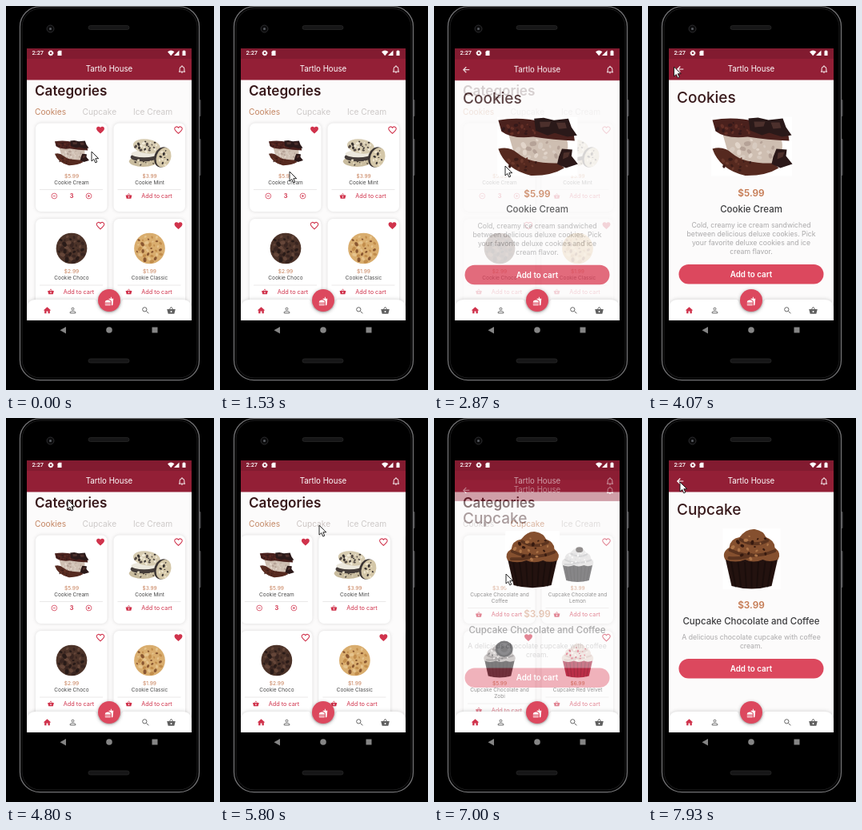
These frames come from a looping animation (260x480 px, 8 s). An HTML page:

```html
<!DOCTYPE html>
<html lang="en">
<head>
<meta charset="utf-8">
<title>Sweet shop app</title>
<style>
  html, body { margin: 0; width: 100%; height: 100%; overflow: hidden; background: #000; }
  svg { display: block; width: 100%; height: 100%; font-family: Inter, "Open Sans", sans-serif; }
  .card { filter: drop-shadow(0 0 2px #0002); }
  .bar { filter: drop-shadow(0 -1px 2px #0002); }
  .fab { filter: drop-shadow(0 1.5px 2px #0005); }
</style>
</head>
<body>
<svg id="stage" viewBox="0 0 260 480"></svg>
<script>
const LOOP = 8000, PAGE_MS = 240, TAB_AT = 5780, TAB_MS = 300, SCREEN_W = 206;
const RED = '#d0334c', PINK = '#dc485e', ORANGE = '#c57a52', GREY = '#606060';

const ICONS = {
  home: '<path d="M10 20v-6h4v6h5v-8h3L12 3 2 12h3v8z"/>',
  person: '<g fill="none" stroke="currentColor" stroke-width="2"><circle cx="12" cy="8" r="3"/><path d="M5 19v-2c0-4 14-4 14 0v2z"/></g>',
  search: '<g fill="none" stroke="currentColor" stroke-width="2"><circle cx="9.5" cy="9.5" r="5.5"/><path d="M14 14l6 6"/></g>',
  basket: '<path fill-rule="evenodd" d="M1 9h22l-3 12H4zM12 13a2 2 0 1 0 .1 0z"/><path d="M7 10l5-7 5 7" fill="none" stroke="currentColor" stroke-width="2"/>',
  heart: '<path d="M12 21C5 15 2 12 2 8.5A5.4 5.4 0 0 1 12 6a5.4 5.4 0 0 1 10 2.5C22 12 19 15 12 21z"/>',
  bell: '<path d="M6 17v-6a6 6 0 0 1 12 0v6l2 1.5H4zM12 5V2" fill="none" stroke="currentColor" stroke-width="2"/><path d="M10 20h4a2 2 0 0 1-4 0z"/>',
  back: '<path d="M20 12H5M12 5l-7 7 7 7" fill="none" stroke="currentColor" stroke-width="2.4"/>',
  food: '<path d="M18.06 23h1.66c.84 0 1.53-.64 1.63-1.46L23 5.05h-5V1h-2v4.05h-5l.3 2.34c1.7.47 3.3 1.32 4.27 2.26 1.44 1.42 2.43 2.89 2.43 5.29zM1 22v-1h15v1q0 1-1 1H2q-1 0-1-1zm15-7c0-8-15-8-15 0zM1 17h15v2H1z"/>',
  plus: '<path d="M3 12a9 9 0 1 0 18 0 9 9 0 1 0-18 0M8 12h8M12 8v8" fill="none" stroke="currentColor" stroke-width="2"/>',
  minus: '<path d="M3 12a9 9 0 1 0 18 0 9 9 0 1 0-18 0M8 12h8" fill="none" stroke="currentColor" stroke-width="2"/>'
};
const icon = (name, x, y, size, color, attrs = `fill="${color}"`) =>
  `<g transform="translate(${x - size / 2} ${y - size / 2}) scale(${size / 24})" color="${color}" ${attrs}>${ICONS[name]}</g>`;
const text = (x, y, str, size, fill, anchor = 'middle', weight = 400) =>
  `<text x="${x}" y="${y}" font-size="${size}" fill="${fill}" text-anchor="${anchor}" font-weight="${weight}">${str}</text>`;
const path = (d, fill) => `<path d="${d}" fill="${fill}"/>`;
const ellipse = (x, y, rx, ry, fill, turn = 0) =>
  `<ellipse cx="${x}" cy="${y}" rx="${rx}" ry="${ry}" fill="${fill}" transform="rotate(${turn} ${x} ${y})"/>`;

// Evenly spread crumbs inside an ellipse.
function crumbs(count, x, y, rx, ry, size, colors) {
  let out = '';
  for (let i = 0; i < count; i++) {
    const a = i * 2.4, r = Math.sqrt((i + .5) / count), s = size * (.6 + (i * 7 % 5) / 6);
    out += ellipse((x + rx * r * Math.cos(a)).toFixed(1), (y + ry * r * Math.sin(a)).toFixed(1),
      s.toFixed(1), (s * .7).toFixed(1), colors[i % colors.length], i * 50 % 180);
  }
  return out;
}

const roundCookie = (base, chips, size) => ellipse(0, 0, 43, 43, base) + crumbs(34, 0, 0, 38, 38, size, chips);

function cupcake(frost, shade, wrap, bits, topping = '') {
  let folds = '';
  for (let i = -3; i <= 3; i++) folds += `M${i * 8.5} 4L${i * 6.6} 36`;
  return path('M-36-38H36V38H-36Z', '#fff') + path('M-33-1H33L25 34Q0 41-25 34Z', wrap) +
    `<path d="${folds}" stroke="#0004" stroke-width="2"/>` +
    path('M-33 1Q-38-8-28-14Q-27-25-15-27Q-7-38 4-37Q15-35 18-27Q29-23 29-14Q38-7 33 1Q22 5 14 1Q2 6-8 1Q-20 6-33 1Z', frost) +
    `<path d="M-27-11Q0 2 29-10M-14-24Q4-14 20-23M-28-1Q-8 0 0-5" stroke="${shade}" stroke-width="4" fill="none" stroke-linecap="round"/>` +
    crumbs(20, 0, -15, 25, 15, 2.3, bits) + topping;
}

const PICTURES = {
  cream:
    path('M-50.5-37H50.5V37H-50.5Z', '#fff') +
    path('M-36-15L37-11Q41 6 34 18Q20 28 0 26Q-22 20-30 6Z', '#cebeb1') +
    crumbs(18, 3, 4, 28, 13, 3.4, ['#e2d5ca', '#b5a297', '#d8cbc0']) +
    path('M-49 3Q-35-1-24 9Q-9 22 27 21L34 27Q18 37-8 36.5Q-40 29-49 3Z', '#55291f') +
    crumbs(14, -20, 22, 19, 9, 2.2, ['#6a382b', '#3b1c18']) +
    path('M-49-33Q-22-38 6-31L34-27 46-14 47-7Q20-8-5-12Q-32-9-45-19Z', '#4a211d') +
    crumbs(18, -20, -22, 23, 8, 2.2, ['#653027', '#34191a']) +
    path('M-4-35L8-36 21-33 39-35 43-24 50-14 38-12 22-17 13-14-2-20Z', '#2a1919') +
    path('M3-31L17-31 15-25 4-24ZM24-30L35-30 37-23 27-22Z', '#4c302c') +
    path('M31 3L44 4 43 12 51 22 36 27 25 22 27 13Z', '#2b1818') +
    path('M33 8L41 7 39 13 32 16Z', '#4e302b'),
  mint:
    ellipse(-18, 24, 39, 15, '#c9bc9e') + ellipse(-16, 12, 37, 12, '#453d3a') +
    ellipse(-15, 3, 36, 10, '#ece8dd') + ellipse(-8, -18, 38, 20, '#d6cbb0', 8) +
    ellipse(35, 12, 22, 29, '#3c3533', 20) + ellipse(39, 13, 20, 28, '#d4c7a8', 20) +
    crumbs(20, -8, -18, 33, 15, 4, ['#37312f', '#f1ead8', '#544a44']) +
    crumbs(12, 39, 13, 14, 22, 3.7, ['#37312f', '#eee4cd']) +
    crumbs(9, -18, 27, 31, 8, 3, ['#494039', '#e4dac1']),
  choco: roundCookie('#4c3329', ['#291b18', '#654639', '#392520'], 6),
  classic: roundCookie('#d9ad6e', ['#8a5730', '#e6c48d', '#c28d4c'], 5),
  coffee: cupcake('#85502f', '#5c341f', '#23120f', ['#35190f', '#ad7448']),
  lemon: cupcake('#dcdcdc', '#bcbcbe', '#343336', ['#f8f8f8', '#cfcfd1'], ellipse(4, -33, 8, 6, '#46413f')),
  biscuit: cupcake('#b5aead', '#7a7474', '#242124', ['#e6e2e0', '#454143'],
    ellipse(10, -25, 19, 18, '#202024') + ellipse(10, -25, 14, 13, '#3c3c41') + ellipse(10, -25, 8, 7, '#27272b')),
  velvet: cupcake('#eadbd4', '#d8bfb9', '#a51c39', ['#c52342', '#fff6f0', '#d94b62'])
};

const MENUS = [
  [['cream', '$5.99', ['Cookie Cream'], 1, .43, 3], ['mint', '$3.99', ['Cookie Mint'], 0, .45],
   ['choco', '$2.99', ['Cookie Choco'], 0, .45], ['classic', '$1.99', ['Cookie Classic'], 1, .45]],
  [['coffee', '$3.99', ['Cupcake Chocolate and', 'Coffee'], 1, .57], ['lemon', '$3.99', ['Cupcake Chocolate and', 'Lemon'], 0, .57],
   ['biscuit', '$5.99', ['Cupcake Chocolate and', 'Zobi'], 1, .57], ['velvet', '$6.99', ['Cupcake Red Velvet'], 0, .57]]
];

function card([pic, price, lines, liked, scale, count], i) {
  const extra = (lines.length - 1) * 8, y = 91 + extra;
  const heart = liked ? icon('heart', 81, 8.5, 12, RED)
    : icon('heart', 81, 8.5, 11.5, RED, `fill="none" stroke="${RED}" stroke-width="2.2"`);
  const order = count
    ? icon('minus', 23.3, y, 9, RED) + text(45, y + 2.7, count, 7.3, RED, 'middle', 700) + icon('plus', 66.5, y, 9, RED)
    : icon('basket', 19, y, 8.5, RED) + text(54, y + 2.7, 'Add to cart', 7.3, RED);
  return `<g transform="translate(${37 + 97.5 * (i % 2)} ${146.5 + 119.5 * (i >> 1)})">
    <rect class="card" width="89.5" height="110.5" rx="7" fill="#fff"/>
    <use id="card-${pic}" href="#${pic}" transform="translate(45 37) scale(${scale})"/>${heart}
    ${text(45, 68, price, 6.6, ORANGE)}${lines.map((l, n) => text(45, 76 + 8 * n, l, 6.5, '#484848')).join('')}
    <path d="M5 ${83 + extra}h79" stroke="#e5e3e3" stroke-width=".8"/>${order}</g>`;
}

const DETAILS = [
  { pic: 'cream', open: 2660, close: 4440, from: [82, 183.5, .43], to: [129.5, 175.5, 1],
    title: 'Cookies', price: '$5.99', name: 'Cookie Cream',
    about: ['Cold, creamy ice cream sandwiched', 'between delicious deluxe cookies. Pick', 'your favorite deluxe cookies and ice', 'cream flavor.'] },
  { pic: 'coffee', open: 6860, close: LOOP, from: [82, 183.5, .57], to: [129.5, 176, 1],
    title: 'Cupcake', price: '$3.99', name: 'Cupcake Chocolate and Coffee',
    about: ['A delicious chocolate cupcake with coffee', 'cream.'] }
];

const header = back => `<rect x="26" y="53" width="206" height="14" fill="#821b30"/>
  <rect x="26" y="66" width="206" height="26.5" fill="#931f36"/>
  ${text(129, 82, 'Tartlo House', 9.7, '#fff')}${icon('bell', 220, 79, 11.5, '#fff')}${back ? icon('back', 40.3, 79, 12, '#fff') : ''}`;
const paper = '<rect x="26" y="92" width="206" height="301" fill="#fcfbfb"/>';

function detail(d, i) {
  const top = 279 + 11 * d.about.length;
  return `<g id="detail${i}">${paper}${header(true)}
    ${text(36, 120.8, d.title, 19, '#38191b', 'start', 500)}
    ${text(129, 238, d.price, 11.8, ORANGE, 'middle', 600)}${text(129, 257.5, d.name, 11.5, '#3c3c3e', 'middle', 500)}
    ${d.about.map((l, n) => text(129, 277 + 11 * n, l, 8.7, '#aaa9aa')).join('')}
    <rect x="38.5" y="${top}" width="181" height="24.5" rx="12.2" fill="${PINK}"/>
    ${text(129, top + 15.8, 'Add to cart', 9.8, '#fff', 'middle', 600)}</g>
    <use id="hero${i}" href="#${d.pic}"/>`;
}

const phone = `<rect width="260" height="480" fill="#000"/>
  <rect x="241" y="117" width="2.5" height="21" rx="1" fill="#4b4b4d"/><rect x="241" y="166" width="2.5" height="46" rx="1" fill="#4b4b4d"/>
  <rect x="17.5" y=".7" width="224" height="467" rx="25" stroke="#727274" stroke-width="1.3"/>
  <rect x="20" y="3" width="219" height="462" rx="23" fill="#000" stroke="#262627" stroke-width=".8"/>
  <circle cx="55.5" cy="28.5" r="4.5" fill="#0c0c0d" stroke="#2c2c2e"/><circle cx="55.5" cy="28.5" r="1.5" fill="#5a5d63"/>
  <rect x="103" y="24.5" width="51" height="5" rx="2.5" fill="#161617" stroke="#2b2b2c" stroke-width=".7"/>
  <rect x="103" y="441" width="51" height="5" rx="2.5" fill="#161617" stroke="#2b2b2c" stroke-width=".7"/>
  <g fill="#858585"><path d="M75 401v8.5l-7.5-4.2z"/><circle cx="129" cy="405" r="3.8"/><rect x="182.5" y="401.5" width="7" height="7"/></g>`;

const status = `<g fill="#fff" font-family="Roboto, sans-serif"><text x="32.5" y="61.3" font-size="7.4" font-weight="500">2:27</text>
  <circle cx="56" cy="58.8" r="2.1" fill="none" stroke="#fff" stroke-width="1.6"/>
  <circle cx="56" cy="58.8" r="3" fill="none" stroke="#fff" stroke-width="1" stroke-dasharray="1.4 .96"/>
  <path d="M66 55.8h3.5v6.2h-5v-4.7z"/><path d="M202 57.2q4.2-3.3 8.4 0l-4.2 5z"/><path d="M216.5 55.5v6.5h-6.5z"/>
  <path d="M220.5 56.3h1v-.8h2v.8h1V62h-4z"/></g>`;

const bottomBar = `<path class="bar" d="M26 393V379Q26 367 38 367H110Q113 367 114 371A15.3 15.3 0 0 0 144 371Q145 367 148 367H220Q232 367 232 379V393Z" fill="#fff"/>
  ${icon('home', 51.5, 380.5, 11.5, RED)}${icon('person', 83.5, 380.5, 11.5, GREY)}${icon('search', 174.5, 380.5, 11.5, GREY)}${icon('basket', 206.5, 380.5, 11.5, GREY)}
  <circle class="fab" cx="129" cy="368" r="14" fill="${PINK}"/>${icon('food', 129, 369, 11.5, '#fff')}`;

document.getElementById('stage').innerHTML = `<defs>
  <clipPath id="screen"><path d="M26 53h206v340H26z"/></clipPath>
  ${Object.entries(PICTURES).map(([id, art]) => `<g id="${id}">${art}</g>`).join('')}</defs>
  ${phone}<g clip-path="url(#screen)">${paper}${header(false)}
  ${text(36, 112.3, 'Categories', 17.1, '#38191b', 'start', 600)}
  <g id="tabs">${text(36, 135.6, 'Cookies', 10.2, '', 'start')}${text(95.5, 135.6, 'Cupcake', 10.2, '', 'start')}${text(159, 135.6, 'Ice Cream', 10.2, '#cdc9c8', 'start')}</g>
  <g id="menus">${MENUS.map((m, i) => `<g transform="translate(${i * SCREEN_W})">${m.map(card).join('')}</g>`).join('')}</g>
  ${DETAILS.map(detail).join('')}${bottomBar}${status}</g>
  <path id="cursor" d="M0 0v12l2.8-2.5 2 4.4 2-.9-2-4.3h3.9z" fill="#fff" stroke="#111" stroke-width=".9"/>`;

const clamp = v => Math.min(1, Math.max(0, v));
const mix = (a, b, k) => a + (b - a) * k;
const bezier = (x1, y1, x2, y2) => x => {
  const at = (a, b, s) => 3 * a * s * (1 - s) ** 2 + 3 * b * s * s * (1 - s) + s ** 3;
  let lo = 0, hi = 1;
  for (let i = 0; i < 20; i++) {
    const mid = (lo + hi) / 2;
    if (at(x1, x2, mid) < x) lo = mid; else hi = mid;
  }
  return at(y1, y2, hi);
};
const ease = bezier(.25, .1, .25, 1), easeIn = bezier(.42, 0, 1, 1), fastOutSlowIn = bezier(.4, 0, .2, 1);

// Time, x, y
const POINTER = [
  [0, 107, 182], [600, 107, 182], [930, 87, 207], [2070, 87, 207], [2200, 89, 200], [3150, 89, 200],
  [4030, 32.5, 76], [4470, 32.5, 76], [4800, 77, 102], [5200, 122.5, 132.5], [5330, 122.5, 132.5], [5400, 124, 134],
  [5800, 124, 134], [6070, 126, 166], [6600, 90, 195], [7050, 90, 195], [7900, 40, 80], [LOOP, 40, 80]
];
function pointerAt(t) {
  const i = POINTER.findIndex(p => p[0] > t), a = POINTER[i - 1], b = POINTER[i];
  const k = (t - a[0]) / (b[0] - a[0]);
  return [mix(a[1], b[1], k), mix(a[2], b[2], k)];
}

const byId = id => document.getElementById(id);
const tabColor = k => `rgb(${mix(205, 196, k)},${mix(201, 134, k)},${mix(200, 99, k)})`;

function draw(t) {
  const tab = ease(clamp((t - TAB_AT) / TAB_MS));
  byId('menus').setAttribute('transform', `translate(${-SCREEN_W * tab})`);
  const labels = byId('tabs').children;
  labels[0].setAttribute('fill', tabColor(1 - tab));
  labels[1].setAttribute('fill', tabColor(tab));

  DETAILS.forEach((d, i) => {
    const p = clamp((t - d.open) / PAGE_MS) - clamp((t - d.close) / PAGE_MS);
    const page = byId('detail' + i), hero = byId('hero' + i), k = fastOutSlowIn(p);
    const [x, y, s] = d.from.map((v, n) => mix(v, d.to[n], k));
    page.setAttribute('visibility', p > 0 ? 'visible' : 'hidden');
    page.setAttribute('opacity', easeIn(p));
    page.setAttribute('transform', `translate(0 ${85 * (1 - k)})`);
    hero.setAttribute('visibility', p > 0 ? 'visible' : 'hidden');
    hero.setAttribute('transform', `translate(${x} ${y}) scale(${s})`);
    byId('card-' + d.pic).setAttribute('visibility', p > 0 ? 'hidden' : 'visible');
  });
  byId('cursor').setAttribute('transform', `translate(${pointerAt(t)})`);
}

function tick() {
  draw(performance.now() % LOOP);
  requestAnimationFrame(tick);
}
tick();
</script>
</body>
</html>
```
